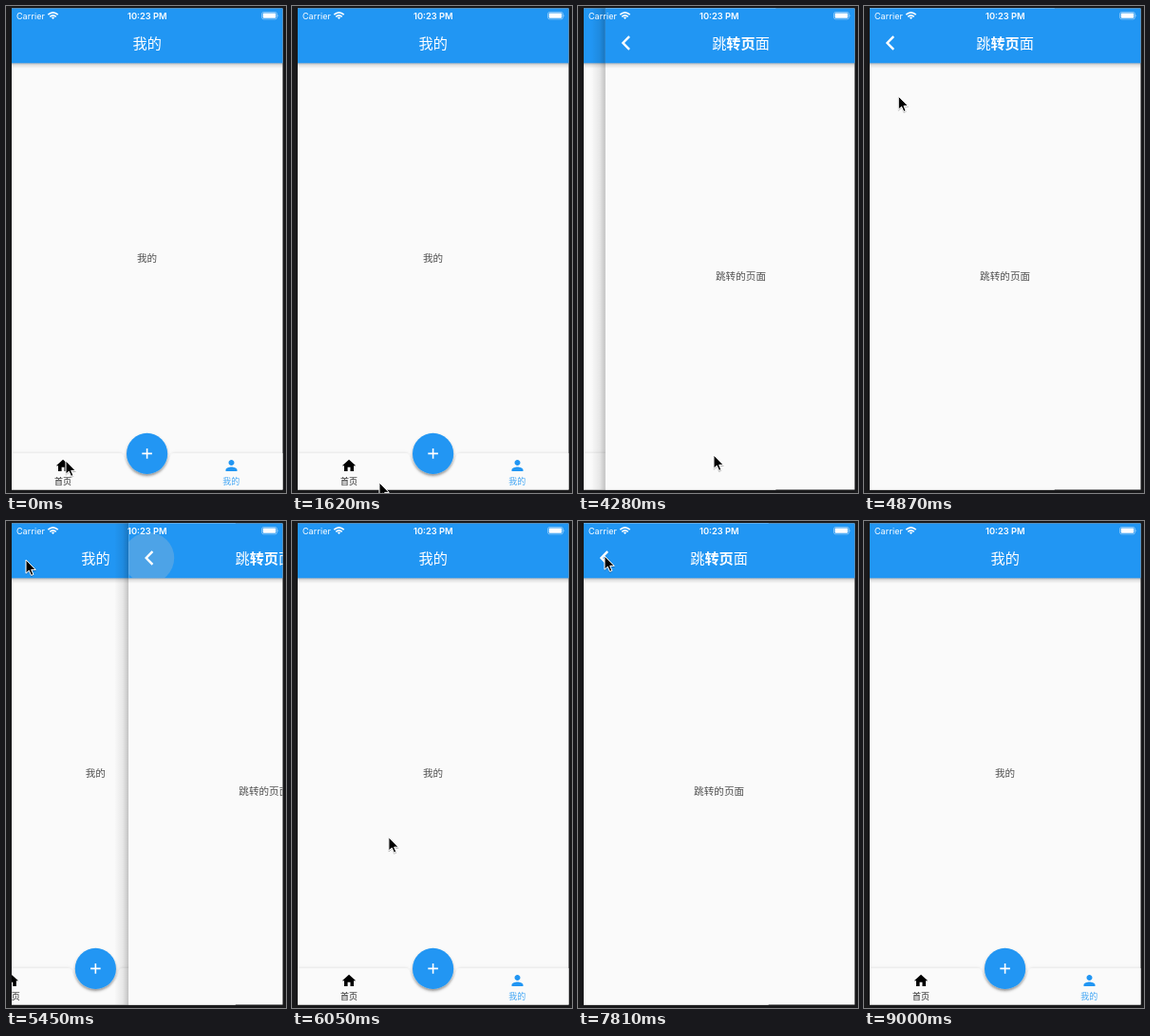
Write an HTML page that moves like this. It is 295x514 px and loops after 9.45 s.

```html
<!DOCTYPE html>
<html lang="zh">
<head>
<meta charset="utf-8">
<title>Tab navigation</title>
<style>
html, body { margin: 0; width: 100%; height: 100%; overflow: hidden; background: #19191b; }
svg { display: block; width: 100vw; height: 100vh; }
text { font-family: "Noto Sans CJK SC", "Noto Sans CJK", sans-serif; text-anchor: middle; }
.title { font-size: 15.2px; fill: #fff; }
.body { font-size: 10.6px; fill: #505050; }
.label { font-size: 9px; }
.status { font-family: Inter, Roboto, sans-serif; fill: #fff; }
</style>
</head>
<body>
<svg viewBox="0 0 295 514">
  <defs>
    <clipPath id="screen"><rect x="6" y="2.5" width="285.5" height="508"/></clipPath>
    <clipPath id="bar"><rect x="6" y="0" width="286" height="60"/></clipPath>
    <linearGradient id="under" x2="0" y2="1">
      <stop stop-color="#000" stop-opacity=".28"/>
      <stop offset=".4" stop-color="#000" stop-opacity=".1"/>
      <stop offset="1" stop-color="#000" stop-opacity="0"/>
    </linearGradient>
    <linearGradient id="edge">
      <stop stop-color="#000" stop-opacity="0"/>
      <stop offset=".6" stop-color="#000" stop-opacity=".08"/>
      <stop offset="1" stop-color="#000" stop-opacity=".23"/>
    </linearGradient>
    <filter id="navShadow" x="-5%" y="-30%" width="110%" height="160%">
      <feDropShadow dx="0" dy="-.5" stdDeviation="1.4" flood-opacity=".1"/>
    </filter>
    <filter id="fabShadow" x="-30%" y="-30%" width="160%" height="170%">
      <feDropShadow dx="0" dy="2" stdDeviation="1.8" flood-opacity=".38"/>
    </filter>
    <filter id="arrowShadow" x="-40%" y="-30%" width="180%" height="170%">
      <feDropShadow dx="0" dy=".8" stdDeviation=".7" flood-opacity=".35"/>
    </filter>
    <g id="frame">
      <rect x="6" width="290" height="514" fill="#fafafa"/>
      <rect x="6" y="60" width="290" height="6" fill="url(#under)"/>
      <rect x="6" width="290" height="60.300" fill="#2196f3"/>
    </g>
  </defs>

  <g clip-path="url(#screen)">
    <g id="main">
      <use href="#frame"/>
      <text id="title" class="title" x="148.800" y="45"></text>
      <text id="body" class="body" x="148.600" y="270.400"></text>
      <path d="M6 472H119Q123.500 472 124 476A25 25 0 0 0 173 476Q173.500 472 178 472H296V514H6Z" fill="#fafafa" filter="url(#navShadow)"/>
      <g id="homeTab">
        <path transform="translate(51.400 476.700) scale(.72)" d="M10 20v-6h4v6h5v-8h3L12 3 2 12h3v8z"/>
        <text class="label" x="60" y="504.800" fill-opacity=".85">首页</text>
      </g>
      <g id="mineTab">
        <path transform="translate(228.500 476) scale(.75)" d="M12 12c2.210 0 4-1.790 4-4s-1.790-4-4-4-4 1.790-4 4 1.790 4 4 4zm0 2c-2.670 0-8 1.340-8 4v2h16v-2c0-2.660-5.330-4-8-4z"/>
        <text class="label" x="237.300" y="504.800" fill-opacity=".85">我的</text>
      </g>
      <circle cx="148.600" cy="472.400" r="21.600" fill="#2196f3" filter="url(#fabShadow)"/>
      <path d="M143.300 472.400h10.600M148.600 467.100v10.600" stroke="#fff" stroke-width="1.600"/>
    </g>

    <g id="next">
      <rect x="-9" width="15" height="514" fill="url(#edge)"/>
      <use href="#frame"/>
      <g clip-path="url(#bar)"><circle id="press" cx="27" cy="39" r="27" fill="#c8c8c8"/></g>
      <path d="M31.200 32.200L24.500 39l6.700 6.800" fill="none" stroke="#fff" stroke-width="2.400"/>
      <text class="title" x="148.600" y="45">跳<tspan font-weight="700">转页</tspan>面</text>
      <text class="body" x="148.600" y="289.400">跳转的页面</text>
    </g>

    <text class="status" x="26" y="13.500" font-size="9" letter-spacing=".1">Carrier</text>
    <text class="status" x="148.800" y="13.500" font-size="9.300" font-weight="600">10:23 PM</text>
    <g fill="none" stroke="#fff" stroke-width="1.700">
      <path d="M44.300 9.200Q49.500 4.600 54.700 9.200M46.300 11.300Q49.500 8.600 52.700 11.300"/>
      <path d="M47.800 12.100Q49.500 10.800 51.200 12.100L49.500 14Z" fill="#fff" stroke="none"/>
    </g>
    <rect x="269.500" y="6.500" width="16" height="7.400" rx="2" fill="none" stroke="#fff" stroke-opacity=".5" stroke-width=".8"/>
    <rect x="270.700" y="7.600" width="13.600" height="5.200" rx="1" fill="#fff"/>
    <path d="M286.500 8.900q1.400 1.300 0 2.600z" fill="#fff" fill-opacity=".6"/>
  </g>

  <path id="cursor" d="M0 0V14.200L3.300 11.200 5.600 16.400 7.900 15.400 5.700 10.400H10.200Z" stroke="#fff" filter="url(#arrowShadow)"/>
</svg>
<script>
const LOOP = 9450, STEP = 147.27, WIDTH = 286, SLIDE = 3, CURSOR_END = 60;
const $ = id => document.getElementById(id);

const tabTaps = [
  { at: 0, name: "我的" }, { at: 1, name: "首页" }, { at: 7, name: "我的" },
  { at: 13, name: "首页" }, { at: 20, name: "我的" }
];
const pageTaps = [
  { at: -SLIDE, open: false }, { at: 27, open: true }, { at: 36, open: false },
  { at: 43, open: true }, { at: 53.5, open: false }
];
const rest = { x: 63, y: 480 };
const trips = [
  { at: 2, steps: 4, x: 237, y: 491 },
  { at: 10, steps: 1, x: 92, y: 503 },
  { at: 11, steps: 2, x: 64, y: 485 },
  { at: 14, steps: 4, x: 237, y: 491 },
  { at: 23, steps: 3, x: 143, y: 474 },
  { at: 31, steps: 4, x: 21, y: 41 },
  { at: 40, steps: 3, x: 136, y: 457 },
  { at: 46, steps: 5, x: 28, y: 37 },
  { at: 56, steps: 4, x: 147, y: 433 }
];

const clamp = u => Math.max(0, Math.min(1, u));
const easeOut = (u, power) => 1 - (1 - clamp(u)) ** power;
const latest = (list, k) => list.filter(e => e.at <= k).pop();
const move = (el, x, y) => el.setAttribute("transform", `translate(${x} ${y})`);
const show = (el, on) => el.setAttribute("visibility", on ? "visible" : "hidden");

function pointer(k) {
  return trips.reduce((p, trip) => {
    const u = easeOut((k - trip.at) / trip.steps, 3);
    return { x: p.x + (trip.x - p.x) * u, y: p.y + (trip.y - p.y) * u };
  }, rest);
}

// Opening settles exponentially, closing eases out.
function pageOffset(open, age) {
  if (!open) return WIDTH * easeOut(age / SLIDE, 1.39);
  return age < SLIDE ? WIDTH * Math.exp(-1.42 * age ** 0.83) : 0;
}

function draw(time) {
  const k = Math.floor((time % LOOP) / STEP);

  const { name } = latest(tabTaps, k);
  const home = name === "首页";
  $("title").textContent = name;
  $("body").textContent = name;
  $("homeTab").setAttribute("fill", home ? "#2196f3" : "#000");
  $("mineTab").setAttribute("fill", home ? "#000" : "#2196f3");

  const page = latest(pageTaps, k), age = k - page.at;
  const offset = pageOffset(page.open, age);
  move($("main"), (offset - WIDTH) / 3, 0);
  move($("next"), offset, 0);
  show($("next"), offset < WIDTH);
  $("press").setAttribute("opacity", page.open ? 0 : 0.3 * (1 - clamp(age / SLIDE) ** 2));

  const { x, y } = pointer(k);
  move($("cursor"), x, y);
  show($("cursor"), k <= CURSOR_END);
}

const start = performance.now();
function tick() {
  draw(performance.now() - start);
  requestAnimationFrame(tick);
}
tick();
</script>
</body>
</html>
```
